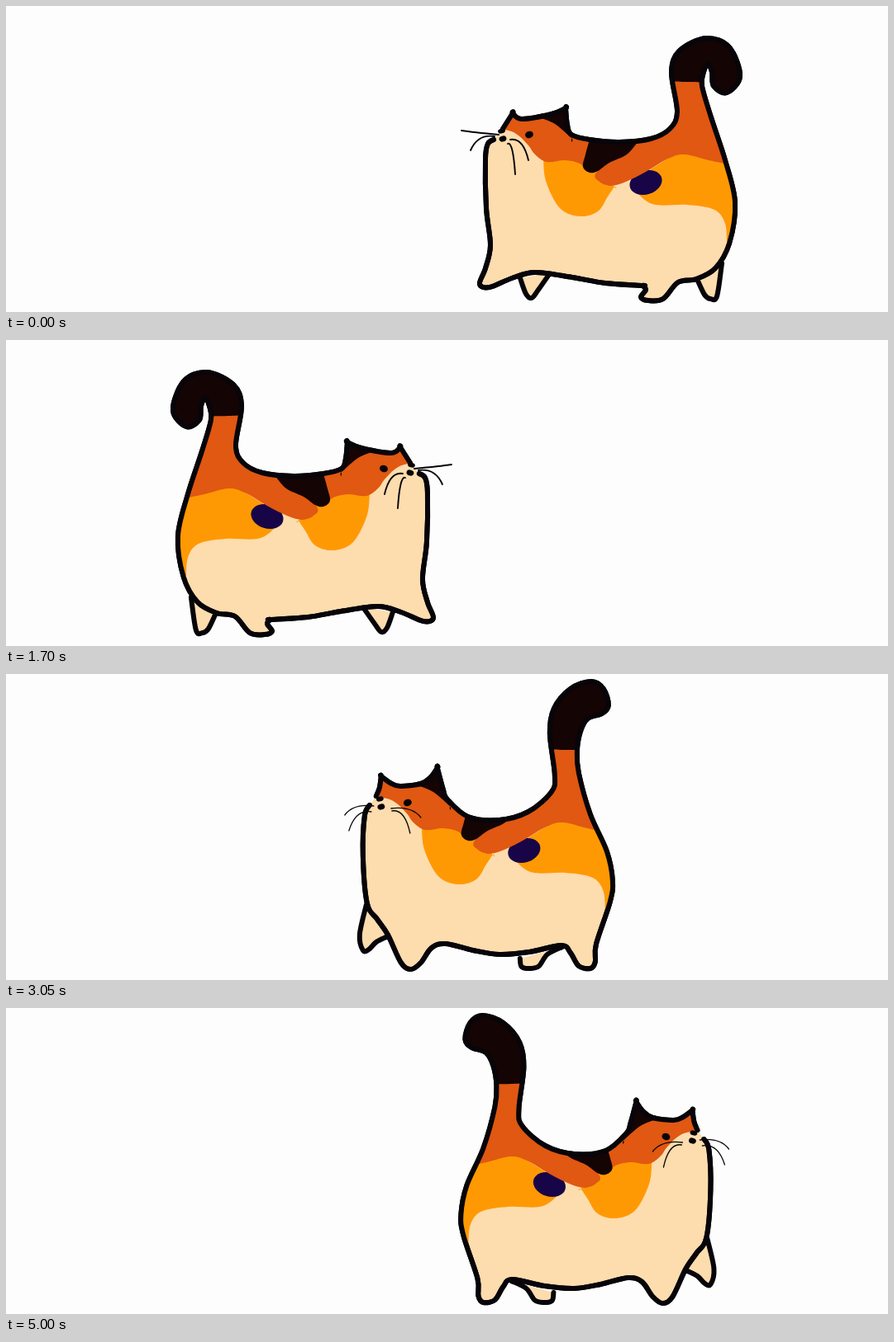
Recreate the animation shown at these times as an HTML page with a canvas. Size 1067 by 371 pixels, loop 5050 ms.

```html
<!DOCTYPE html>
<html lang="en">
<head>
<meta charset="utf-8">
<title>Walking cat</title>
<style>
html, body { margin: 0; width: 100%; height: 100%; overflow: hidden; background: #fdfdfd; }
canvas { display: block; }
</style>
</head>
<body>
<canvas id="stage" width="1067" height="371"></canvas>
<script>
const INK = '#070509', CREAM = '#fddcae', ORANGE = '#ff9903', RUST = '#e05812',
      DARK = '#150404', NAVY = '#170548';
const ctx = document.getElementById('stage').getContext('2d');

// Smooth curve through "x,y" points; a repeated point makes a corner.
function curve(text) {
  const pts = text.trim().split(/\s+/).map(s => s.split(',').map(Number));
  const at = i => pts[Math.max(0, Math.min(pts.length - 1, i))];
  const path = new Path2D();
  path.moveTo(...pts[0]);
  for (let i = 0; i < pts.length - 1; i++) {
    const a = at(i - 1), b = at(i), c = at(i + 1), d = at(i + 2);
    path.bezierCurveTo(b[0] + (c[0] - a[0]) / 6, b[1] + (c[1] - a[1]) / 6,
                       c[0] - (d[0] - b[0]) / 6, c[1] - (d[1] - b[1]) / 6, ...c);
  }
  return path;
}

function spot(x, y, rx, ry) {
  const path = new Path2D();
  path.ellipse(x, y, rx, ry, .3, 0, 7);
  return path;
}

function whisker(x, y, endX, endY) {
  const path = new Path2D();
  path.moveTo(x, y);
  path.quadraticCurveTo(x + (endX - x) * .7, y - 3, endX, endY);
  return path;
}

// The cat faces right, with x = 0 at the middle of its navy patch.
const coat = [
  [ORANGE, curve('124,180 121,212 104,245 80,255 58,249 46,231 38,219 38,219 70,180')],
  [ORANGE, curve('18,213 7,230 -12,241 -50,241 -83,247 -96,264 -98,291 -98,291 -130,290 -130,180 -50,170')],
  [NAVY, spot(0, 214, 20, 14.5)],
  [RUST, curve('-105,193 -76,187 -47,180 -27,185 0,201 24,213 42,218 56,213 60,202 30,172 -5,140 -20,40 -90,60')],
  [RUST, curve('70,201 80,191 98,187 120,189 134,180 142,169 154,157 166,151 184,149 184,149 184,100 80,100 50,150')],
  [DARK, curve('9,164 23,180 44,190 58,200 68,202 76,195 73,180 66,155')],
  [DARK, curve('129,135 129,135 110,143 90,160 90,160 86,105 112,105')],
  [DARK, curve('0,91 0,91 -47,92 -74,95 -84,115 -130,112 -130,0 0,0')]
];
const face = [spot(141, 156, 5, 4.2), spot(173, 161, 4.5, 3.5), spot(174.5, 151.5, 4.5, 3)];

const tailUp = {
  shift: 53,
  hair: 1.9,
  body: curve(`184,162 191,167 194,185 193,245 188,290 194,318 201,337 189,341 162,330
    134,323 89,329 49,336 4,339 4,339 0,344 6,353 -3,357 -21,355 -39,335 -61,331 -84,318
    -101,288 -108,238 -96,187 -79,135 -68,97 -70,80 -75,70 -80,80 -82,97 -98,105 -114,85
    -101,50 -73,39 -41,54 -31,80 -38,128 -29,149 -6,161 32,165 68,162 90,156 95,144
    97,124 97,124 114,131 150,137 161,130 161,130 173,149`),
  legs: [curve('152,330 145,349 138,354 130,344 116,324'),
         curve('-62,331 -71,350 -78,355 -86,352 -92,312')],
  whiskers: [whisker(178, 156, 223, 151), whisker(183, 158, 212, 175),
             whisker(167, 167, 158, 204), whisker(164, 162, 142, 187)]
};

const tailBent = {
  shift: 60,
  hair: 1.3,
  body: curve(`187,159 193,172 195,220 190,278 178,297 165,316 149,350 137,358 125,350
    112,332 95,327 62,335 30,340 -6,337 -45,329 -56,338 -66,354 -80,357 -86,349 -87,328
    -104,276 -107,250 -100,215 -80,170 -66,120 -64,94 -68,70 -77,54 -94,48 -102,38 -96,18
    -81,9 -56,18 -36,42 -31,72 -37,122 -33,143 -5,167 30,177 68,173 93,152 98,140
    105,114 105,114 113,125 125,133 150,136 162,132 173,124 173,124 175,138 179,148`),
  legs: [curve('-46,331 -28,340 -18,354 -8,357 3,355 5,345'),
         curve('191,280 199,316 195,335 188,334 179,325 167,319')],
  whiskers: [whisker(182, 160, 217, 171), whisker(185, 167, 212, 190),
             whisker(161, 163, 125, 174), whisker(160, 166, 138, 193)]
};

function drawCat(pose, x, facing) {
  ctx.save();
  ctx.translate(x - facing * pose.shift, 0);
  ctx.scale(facing, 1);
  ctx.lineCap = ctx.lineJoin = 'round';
  ctx.strokeStyle = INK;
  ctx.lineWidth = 6;
  ctx.fillStyle = CREAM;
  for (const part of [...pose.legs, pose.body]) {
    ctx.fill(part);
    ctx.stroke(part);
  }
  ctx.save();
  ctx.clip(pose.body);
  for (const [color, patch] of coat) {
    ctx.fillStyle = color;
    ctx.fill(patch);
  }
  ctx.restore();
  ctx.stroke(pose.body);
  ctx.fillStyle = INK;
  face.forEach(mark => ctx.fill(mark));
  ctx.lineWidth = pose.hair;
  pose.whiskers.forEach(hair => ctx.stroke(hair));
  ctx.restore();
}

const LOOP = 5050, STEP = 50, LAP = 2640, TURN = 1452;

function draw(time) {
  const t = Math.floor(time % LOOP / STEP) * STEP;
  const lap = t > 2650 ? t - LAP : t;
  const left = lap < TURN;
  const walked = left ? lap : lap - TURN;
  const x = left ? 721 - .376 * walked : 238 + .528 * walked;
  const stride = Math.floor(walked / (left ? 110 : 120));
  ctx.fillStyle = '#fdfdfd';
  ctx.fillRect(0, 0, 1067, 371);
  drawCat(stride % 2 ? tailBent : tailUp, x, left ? -1 : 1);
}

let start;
function tick(now) {
  start ??= now;
  draw(now - start);
  requestAnimationFrame(tick);
}
draw(0);
requestAnimationFrame(tick);
</script>
</body>
</html>
```
